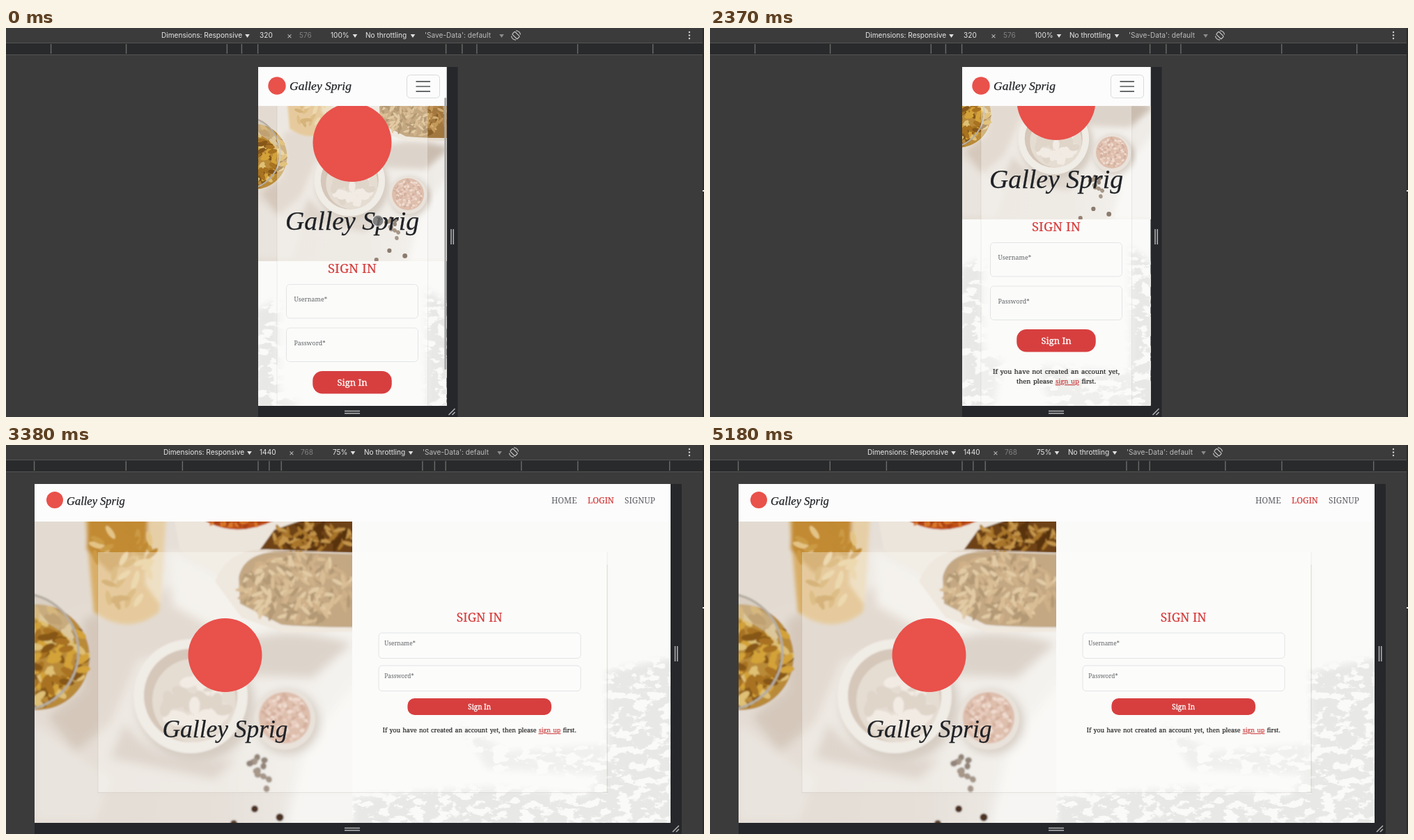
An HTML page for the animation above (5200 ms loop, 1002 px wide and 559 px high).

```html
<!DOCTYPE html>
<html lang="en">
<head>
<meta charset="utf-8">
<title>Responsive sign-in page</title>
<style>
  html, body { margin: 0; width: 100%; height: 100%; overflow: hidden; background: #3b3b3b; }
  svg { display: block; width: 1002px; height: 559px; }
  text { font-family: "Noto Serif", serif; }
  .ui { font-family: Inter, sans-serif; font-size: 10.1px; fill: #e8e8e8; }
  .dim { fill: #808080; }
  .soft { fill: #bcbcbc; }
  .brand { font-family: "Liberation Serif", serif; font-style: italic; fill: #1f2226; stroke: #1f2226; stroke-width: .25px; }
  .title { fill: #d63c3c; stroke: #d63c3c; stroke-width: .2px; }
  .label { fill: #5c5f63; }
  .note { fill: #222; stroke: #222; stroke-width: .2px; word-spacing: .12em; }
  .link { fill: #c93a3a; stroke: #c93a3a; text-decoration: underline; }
  .press { fill: #fff; stroke: #fff; stroke-width: .3px; }
  .mid { text-anchor: middle; }
  .field { fill: #fff; fill-opacity: .2; stroke: #e3e4e6; }
  .grip { fill: none; stroke: #b4b4b4; stroke-width: 1.5; }
</style>
</head>
<body>
<svg id="stage" viewBox="0 0 1002 559" xmlns="http://www.w3.org/2000/svg"></svg>
<script>
const LOOP = 5200, BRAND = 'Galley Sprig', RED = '#e9514b';
let seed = 11;
const rand = () => (seed = seed * 16807 % 2147483647) / 2147483647;

const rect = (x, y, w, h, fill, more = '') =>
  `<rect x="${x}" y="${y}" width="${w}" height="${h}" fill="${fill}" ${more}/>`;
const disc = (x, y, r, fill, more = '') => `<circle cx="${x}" cy="${y}" r="${r}" fill="${fill}" ${more}/>`;
const path = (d, fill, more = '') => `<path d="${d}" fill="${fill}" ${more}/>`;
const text = (x, y, s, cls, size) =>
  `<text x="${x}" y="${y}" class="${cls}"${size ? ` style="font-size:${size}px"` : ''}>${s}</text>`;
const clip = (id, x, y, w, h) => `<clipPath id="${id}">${rect(x, y, w, h, '#000')}</clipPath>`;

// Random pieces of food spread over an ellipse
function scatter(cx, cy, rx, ry, n, w, h, colors) {
  let out = '';
  for (let i = 0; i < n; i++) {
    const a = rand() * 6.283, d = Math.sqrt(rand());
    const x = (cx + Math.cos(a) * d * rx).toFixed(1), y = (cy + Math.sin(a) * d * ry).toFixed(1);
    out += `<ellipse rx="${w}" ry="${h}" fill="${colors[i % colors.length]}" transform="translate(${x} ${y}) rotate(${Math.round(rand() * 180)})"/>`;
  }
  return out;
}

const photo = `<g id="photo" filter="url(#haze)">
  ${rect(-90, -100, 800, 760, 'url(#linen)')}
  <g filter="url(#blur)">
    ${path('M-90 -60H130V230L70 250-90 220Z', '#e3dbd1')}
    ${path('M110 250L250 200 330 250 260 290 190 310 150 400 100 440 60 390 110 350Z', '#d5c8bb')}
    ${path('M300 285Q400 255 497 285L440 335 340 330Z', '#cabdb0')}
    ${path('M170 400Q220 470 330 450L300 480 150 450Z', '#cdc0b3')}
    ${path('M40 400L150 480 130 540H40Z', '#e9e4de')}
    ${path('M430 430L510 330V550H400Z', '#f6f5f3')}
    ${path('M235 150L335 205 350 245 400 268 330 280 240 230Z', '#f0ece6')}
  </g>
  <g filter="url(#edge)">
    ${path('M110 60H232L220 240Q175 275 126 240Z', '#d9ae68')}
    ${path('M120 60H200L205 140 150 185 116 150Z', '#c28a30')}
    ${path('M205 70H232L222 230 200 200Z', '#e6cfa6')}
  </g>
  ${scatter(168, 165, 42, 70, 40, 11, 4, ['#cb9a44', '#e4c486', '#c08a33'])}
  ${path('M233 60H510V160H370L335 205 250 152Z', '#ece5db')}
  ${path('M284 108Q330 135 386 108Z', '#bd4f18')}
  ${scatter(335, 112, 40, 6, 24, 4, 2, ['#da7a2c', '#a93f12'])}
  ${path('M362 154L385 122 425 108H510V158Z', '#6e4314')}
  ${scatter(440, 133, 60, 18, 75, 9, 2.6, ['#a8752c', '#59330d', '#c4954c'])}
  ${path('M300 196Q318 148 375 150L510 156V268L400 270 338 248Z', '#e6dccf')}
  ${path('M334 190Q342 152 400 153L510 157V262Q430 262 395 258L336 228Z', '#a2783f')}
  ${scatter(420, 206, 82, 49, 190, 9, 2.8, ['#c49a5c', '#8a6029', '#b58548', '#d2ae74'])}
  ${disc(20, 297, 84, '#d9cfc1')}
  ${disc(44, 305, 76, '#b98a38')}
  ${scatter(42, 305, 73, 70, 170, 11, 5, ['#d3a238', '#a87220', '#dfc074', '#865718'])}
  ${path('M-60 215Q30 190 94 255L98 285Q40 225-60 245Z', '#d9d0c4', 'opacity=".5"')}
  ${disc(20, 297, 84, 'none', 'stroke="#b5ada2" stroke-width="3.5"')}
  ${disc(272, 372, 84, '#bfb1a3', 'filter="url(#blur)"')}
  ${disc(265, 361, 82, '#e9e2da')}
  ${disc(265, 360, 67, '#bfa994')}
  ${disc(270, 367, 60, '#d8cabc')}
  ${scatter(270, 374, 46, 38, 35, 13, 8, ['#eae1d7', '#cfbeae'])}
  ${disc(404, 398, 46, '#bfb2a6', 'filter="url(#blur)"')}
  ${disc(400, 394, 44, '#ddd3c9')}
  ${disc(400, 392, 37, '#cc9a80')}
  ${scatter(400, 392, 33, 33, 110, 3.5, 2.5, ['#dcb19b', '#bd846b', '#e7c8b6'])}
  ${scatter(362, 474, 18, 27, 12, 5, 4.5, ['#755d48', '#594231'])}
  ${disc(357, 523, 5, '#4b3220')}${disc(393, 535, 5.5, '#4b3220')}${disc(327, 544, 5, '#5a3d27')}
</g>`;

const blur = (id, size) => `<filter id="${id}"><feGaussianBlur stdDeviation="${size}"/></filter>`;

const defs = `<defs>
  <linearGradient id="linen"><stop offset="0" stop-color="#e3dbd2"/><stop offset=".5" stop-color="#e6e0d9"/>
    <stop offset=".7" stop-color="#efece8"/><stop offset="1" stop-color="#f0eeeb"/></linearGradient>
  ${blur('haze', .9)}${blur('edge', 2.5)}${blur('blur', 7)}
  <filter id="shade" x="-10%" y="-10%" width="120%" height="120%">
    <feDropShadow dx="0" dy="1" stdDeviation="3" flood-color="#000" flood-opacity=".2"/></filter>
  <filter id="grunge" color-interpolation-filters="sRGB">
    <feGaussianBlur in="SourceGraphic" stdDeviation="5" result="soft"/>
    <feTurbulence type="fractalNoise" baseFrequency=".05 .09" numOctaves="5" seed="4"/>
    <feColorMatrix values="0 0 0 0 0 0 0 0 0 0 0 0 0 0 0 14 0 0 0 -5.9"/>
    <feComposite in="soft" operator="in"/></filter>
  ${clip('pageA', 362, 112, 271, 431)}${clip('heroA', 362, 0, 271, 335)}
  ${clip('heroB', 172, 117, 650, 146)}${clip('heroC', 41, 110, 456, 433)}
  ${clip('bodyB', 172, 117, 650, 426)}${clip('bodyC', 41, 110, 913, 433)}
  ${photo}
</defs>`;

const caret = (x, fill = '#e0e0e0') => path(`M${x - 3.3} 9h6.6l-3.3 5z`, fill);

// Device toolbar and ruler; x holds the left edge of each item
function toolbar(x, width, height, zoom, k) {
  const ticks = [320, 375, 425, 768, 1024, 1440]
    .flatMap(w => [496.6 - w * k, 496.6 + w * k])
    .filter(p => p > 0 && p < 1000)
    .map(p => rect(p - .7, 23, 1.4, 14, '#6b6b6b')).join('');
  const i = x[8];
  return text(x[0], 14, 'Dimensions: Responsive', 'ui') + caret(x[0] + 123.5)
    + text(364, 14, width, 'ui') + text(x[1], 14.5, '×', 'ui soft mid', 12) + text(x[2], 14, height, 'ui dim')
    + text(x[3], 14, zoom, 'ui') + caret(x[4])
    + text(x[5], 14, 'No throttling', 'ui') + caret(x[6])
    + text(x[7], 14, "'Save-Data': default", 'ui soft') + caret(x[7] + 110.5, '#8a8a8a')
    + `<g transform="translate(${i} 10.5)" fill="none" stroke="#c4c4c4" stroke-width="1.2">
      <rect x="-2.7" y="-5" width="5.4" height="10" rx="1" transform="rotate(-45)"/>
      <path d="M-6.5 1A6.5 6.5 0 0 0 0 6.7M6.5-1A6.5 6.5 0 0 0 0-6.7"/></g>` + ticks;
}

// Viewport with its resize handles
const frame = (x, r) => rect(x, 56, r - x + 16, 503, '#25272a') + rect(x, 56, r - x, 487, '#fafaf9')
  + path(`M${r + 6.5} 289v22M${r + 9.8} 289v22M486 550.5h22M486 553.8h22M${r + 3} 556l9-9M${r + 8} 556l4-4`, 'none', 'class="grip"');

const header = (x, w, h, cx, cy, r, tx, ty, size) =>
  rect(x, 56, w, h, '#fcfcfc') + disc(cx, cy, r, RED) + text(tx, ty, BRAND, 'brand', size);

const burger = (x, y) => rect(x, y, 47, 33, 'none', 'rx="5" stroke="#d9dadb"')
  + path(`M${x + 13} ${y + 9.3}h20.5M${x + 13} ${y + 16.5}h20.5M${x + 13} ${y + 23.7}h20.5`, 'none', 'stroke="#55585b" stroke-width="1.7"');

const hero = (cx, cy, r, y, size) => disc(cx, cy, r, RED) + text(cx, y, BRAND, 'brand mid', size);

const panel = (x, y, w, h) => rect(x, y, w, h, '#fcfbfa', 'fill-opacity=".36"')
  + path(`M${x} ${y}V${y + h}M${x + w} ${y}V${y + h}`, 'none', 'stroke="#6b6259" stroke-opacity=".1"');

const patches = d => path(d, '#e8e9e7', 'filter="url(#grunge)"');

const link = '<tspan class="link">sign up</tspan>';

function form(f) {
  const field = (y, s) => rect(f.x, y, f.w, f.h, '#fff', 'class="field" rx="5"')
    + text(f.x + f.pad, y + f.h / 2 + f.small * .03, s, 'label', f.small);
  return text(f.cx, f.titleY, 'SIGN IN', 'title mid', f.title)
    + field(f.y1, 'Username*') + field(f.y2, 'Password*')
    + rect(f.cx - f.bw / 2, f.by, f.bw, f.bh, '#d73f3f', `rx="${f.br}"`)
    + text(f.cx, f.by + f.bh / 2 + f.press * .36, 'Sign In', 'press mid', f.press)
    + f.note.map(([y, s]) => text(f.cx, y, s, 'note mid', f.noteSize)).join('');
}

const phone = `<g id="phone">${toolbar([223, 407, 421, 466, 501, 516, 584, 601, 732], '320', '576', '100%', .4219)}
  ${frame(362, 632.5)}
  <g clip-path="url(#pageA)"><g id="scroll">
    ${patches('M358 405L392 390V640H358ZM603 375L640 400V640H603ZM362 500L420 540 400 640H362ZM470 545L600 555 620 520 640 640H500Z')}
    <g clip-path="url(#heroA)"><use href="#photo" transform="translate(329 -4.3) scale(.62)"/></g>
    ${panel(389, 60, 216.5, 560)}
    ${hero(497, 164.5, 56.5, 290, 37.8)}
    ${form({ cx: 497, titleY: 351.5, title: 18.5, x: 402.5, w: 189, h: 48.5, y1: 368.5, y2: 431, pad: 11, small: 8.9,
      bw: 113.5, by: 493, bh: 32.5, br: 14, press: 13, noteSize: 9.45,
      note: [[556.5, 'If you have not created an account yet,'], [571.3, `then please ${link} first.`]] })}
  </g></g>
  ${header(362, 270.5, 56, 389, 83, 12.7, 407, 89, 17.5)}${burger(575.5, 67.5)}
  <rect id="thumb" x="629.3" y="100" width="3" height="391" rx="1.5" fill="#a9a9a9"/>
</g>`;

const tablet = `<g id="tablet">${toolbar([223, 407, 421, 466, 501, 516, 584, 601, 732], '768', '576', '100%', .4219)}
  ${frame(172.5, 822)}
  <g clip-path="url(#bodyB)">
    ${patches('M165 345L240 325V560H165ZM172 450L237 470V560H165ZM755 330L830 350V560H755ZM345 470L470 490 560 480 700 530 660 560H300Z')}
    <g clip-path="url(#heroB)"><use href="#photo" transform="translate(215 -213.8) scale(1.03)"/></g>
    ${panel(237, 100, 520, 460)}
    ${hero(497.5, 96.5, 59, 235, 43)}
    ${form({ cx: 497, titleY: 302, title: 21, x: 304.5, w: 386, h: 49, y1: 321.5, y2: 384.3, pad: 10.5, small: 10.1,
      bw: 295.5, by: 446.5, bh: 32, br: 13, press: 13, noteSize: 10.7,
      note: [[511, `If you have not created an account yet, then please ${link} first.`]] })}
  </g>
  ${header(172.5, 649.5, 61, 202, 85, 14.5, 222, 93, 20)}${burger(764.5, 69.5)}
</g>`;

const desktop = `<g id="desktop">${toolbar([226, 410, 423, 469, 498, 514, 581, 598, 729], '1440', '768', '75%', .3167)}
  ${frame(41, 954)}
  <g clip-path="url(#bodyC)">
    ${patches('M860 325L960 305V560H800L865 450ZM650 400L720 440 860 430V475L690 465ZM497 505L690 490 860 505 960 490V560H497Z')}
    <g clip-path="url(#heroC)"><use href="#photo"/></g>
    ${path('M132 499.5H863V172', 'none', 'stroke="#8d857c" stroke-opacity=".22" filter="url(#shade)"')}
    ${panel(132, 154, 731, 345.5)}
    ${hero(314.5, 302, 53, 420, 35.4)}
    ${form({ cx: 679.7, titleY: 253.7, title: 17.4, x: 535, w: 290, h: 36.5, y1: 270, y2: 317, pad: 8.3, small: 8.3,
      bw: 206.5, by: 364, bh: 24, br: 10, press: 9.9, noteSize: 8.75,
      note: [[413.3, `If you have not created an account yet, then please ${link} first.`]] })}
  </g>
  ${header(41, 913, 54, 70, 79, 12, 87, 85.5, 16.5)}
  ${text(783, 84, 'HOME', 'label', 11.8)}${text(835, 84, 'LOGIN', 'title', 11.8)}${text(888, 84, 'SIGNUP', 'label', 11.8)}
</g>`;

const shell = rect(0, 0, 1002, 559, '#3b3b3b') + rect(0, 22, 1000, 16, '#292a2b')
  + path('M0 21.5H1000M0 38.5H1000', 'none', 'stroke="#555"')
  + rect(1000, 0, 2, 559, '#2b2b2b') + rect(1000, 233, 2, 2, '#e8e8e8')
  + [6, 10.5, 15].map(y => disc(981, y, 1.2, '#d0d0d0')).join('');

const pointers = `<g id="touch">${disc(0, 0, 8, '#6f6f6f', 'fill-opacity=".85" stroke="#e6e6e6" stroke-width="1.2"')}</g>
  <g id="arrow">${path('M.5.5V12.5L3.3 10 5.2 14.3 7 13.5 5.2 9.4H9Z', '#111', 'stroke="#fff"')}</g>`;

const stage = document.getElementById('stage');
stage.innerHTML = defs + shell + phone + tablet + desktop + pointers;

// Hold each [time, value] until the next one
function hold(id, prop, list) {
  const keys = [...list, [LOOP, list[list.length - 1][1]]]
    .map(([t, v]) => ({ offset: t / LOOP, [prop]: v, easing: 'steps(1, end)' }));
  document.getElementById(id).animate(keys, { duration: LOOP, iterations: Infinity });
}
const move = (x, y) => `translate(${x}px, ${y}px)`;

const scroll = [[0, 0], [150, 17], [450, 27], [590, 33.5], [740, 46], [890, 60]];
hold('scroll', 'transform', scroll.map(([t, y]) => [t, move(0, -y)]));
hold('thumb', 'transform', scroll.map(([t, y]) => [t, move(0, y * .8)]));
hold('thumb', 'opacity', [[0, 1], [1330, .4], [1480, 0]]);
hold('phone', 'opacity', [[0, 1], [2640, 0]]);
hold('tablet', 'opacity', [[0, 0], [2640, 1], [2780, 0]]);
hold('desktop', 'opacity', [[0, 0], [2780, 1]]);
hold('touch', 'transform', [[0, move(534, 277)], [1630, move(557, 293)]]);
hold('touch', 'opacity', [[0, 1], [1770, 0]]);
hold('arrow', 'transform', [[0, move(774, 479)], [1920, move(973, 555)]]);
hold('arrow', 'opacity', [[0, 0], [1770, 1], [2370, 0]]);
</script>
</body>
</html>
```
